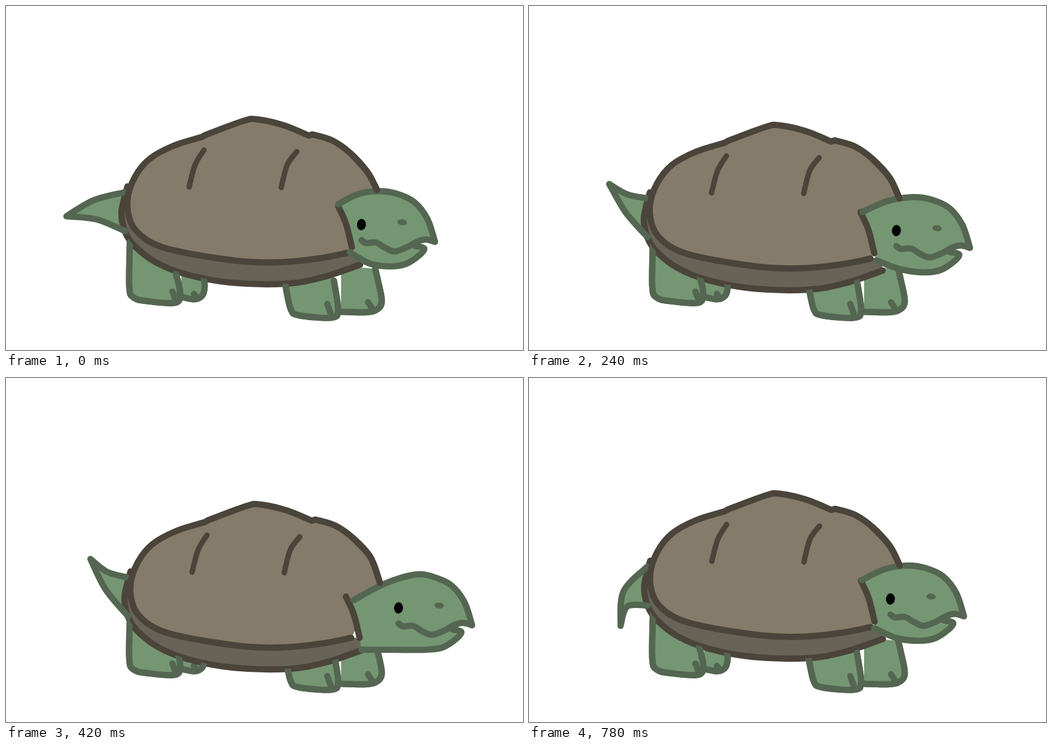
An HTML page with a canvas for the animation above (840 ms loop, 864 by 576 pixels).

```html
<!DOCTYPE html>
<html lang="en">
<head>
<meta charset="utf-8">
<title>Breathing turtle</title>
<style>
  html, body { margin: 0; width: 100%; height: 100%; overflow: hidden; background: #fff; }
  canvas { display: block; width: 864px; height: 576px; }
</style>
</head>
<body>
<canvas id="stage" width="864" height="576"></canvas>
<script>
const ctx = document.getElementById('stage').getContext('2d');
const SHELL = '#847b6a', RIM = '#676457', DARK = '#4b443b';
const GREEN = '#759672', MOSS = '#546651';
const LINE = 10.5;

// "x,y x,y / x,y": smooth runs of points, "/" marks a corner.
const parse = text => text.split('/').map(run =>
  run.trim().split(/\s+/).map(pair => pair.split(',').map(Number)));
const add = ([x, y], [dx, dy]) => [x + dx, y + dy];
const mix = (a, b, k) => a.map((v, i) => v + (b[i] - v) * k);
const shift = (runs, offset) => runs.map(run => run.map(p => add(p, offset)));

function trace(runs) {
  ctx.beginPath();
  runs.forEach((p, r) => {
    if (r) ctx.lineTo(...p[0]); else ctx.moveTo(...p[0]);
    for (let i = 0; i < p.length - 1; i++) {
      const a = p[i - 1] || p[i], b = p[i], c = p[i + 1], d = p[i + 2] || c;
      ctx.bezierCurveTo(b[0] + (c[0] - a[0]) / 6, b[1] + (c[1] - a[1]) / 6,
        c[0] - (d[0] - b[0]) / 6, c[1] - (d[1] - b[1]) / 6, ...c);
    }
  });
}
function fill(runs, color) {
  trace(runs);
  ctx.fillStyle = color;
  ctx.fill();
}
function stroke(runs, color, width = LINE) {
  trace(runs);
  ctx.strokeStyle = color;
  ctx.lineWidth = width;
  ctx.stroke();
}
function oval([x, y], rx, ry, color) {
  ctx.beginPath();
  ctx.ellipse(x, y, rx, ry, 0.08, 0, Math.PI * 2);
  ctx.fillStyle = color;
  ctx.fill();
}

// Moves with the shell.
const dome = parse('604,278 575,246 545,225 512,215 / 506,217 465,200 421,190 398,192 333,216 / ' +
  '328,219 280,234 240,256 215,287 203,325 209,363 230,388 262,404 ' +
  '320,417 400,428 460,429 520,423 572,413');
const rim = parse('203,302 193,345 199,378 215,402 250,429 300,449 375,463 468,465 530,454 592,433');
const rimInside = parse('590,415 400,380');
const marks = parse('331,241 316,266 306,303 / 486,244 470,266 460,304');
const collar = parse('578,404 568,364 555,335');

// Moves with the head.
const brow = parse('622,310 652,314 682,328 704,356 717,395');
const lip = parse('717,395 702,391 688,394 672,403 650,411 634,405 618,396 602,397 594,392');
const jaw = parse('684,402 699,406 690,418 668,432 640,436');

// Stands still.
const legs = [
  '330,452 332,470 328,485 315,491 293,487',
  '207,395 206,470 213,488 235,494 283,497 291,480 284,448',
  '617,440 621,457 628,495 617,510 595,513 560,512',
  '467,468 476,508 490,518 543,522 555,510 548,460'
].map(parse);
const toes = ['278,478 284,493', '314,482 318,487', '537,499 543,516', '605,496 612,507'].map(parse);

// From a depth of 0 (standing tall) to 4 (crouched), the neck reaches out.
function poseAt(depth) {
  const reach = 10 * depth + 11 * Math.max(0, depth - 2);
  const slip = Math.max(0, depth - 3);
  const drop = [0, 4, 10, 14, 22][depth];
  return {
    shell: [7 * slip - depth / 2, drop],
    head: [reach, Math.min(drop, 19)],
    stretch: reach / 62,
    slip
  };
}

function tailRuns([x, y], shell) {
  const tip = [x, y];
  const top = add([198, 312], shell), bottom = add([199, 377], shell);
  const bend = 6 + (y - 345 - shell[1]) / 5;
  const curve = (a, b, away) => {
    const length = Math.hypot(b[0] - a[0], b[1] - a[1]);
    const normal = [(b[1] - a[1]) / length, (a[0] - b[0]) / length];
    return [a, add(mix(a, b, 0.5), normal.map(n => n * away)), b];
  };
  return [curve(top, tip, -bend).map((p, i) => i === 1 ? add(p, [0, 0]) : p), curve(tip, bottom, bend)]
    .map((run, i) => i ? run : curve(tip, top, bend).reverse());
}

function drawHead({ shell, head, stretch, slip }) {
  const [browRun] = shift(brow, head), [lipRun] = shift(lip, head), [jawRun] = shift(jaw, head);
  const nape = [555 + 6 * stretch + 20 * slip, 332 + 40 * stretch];
  const throat = [574 + 20 * stretch, 412 + 43 * stretch];
  const top = [nape, add(mix(nape, browRun[0], 0.5), [0, -6]), ...browRun];
  const under = [...jawRun, add(mix(jawRun.at(-1), throat, 0.5), [0, 7 - 7 * stretch]), throat];
  const edge = shift(collar, add(shell, [8 * slip, 9 * slip]));
  fill([top, lipRun.slice(0, 3), under, edge[0]], GREEN);
  stroke(edge, DARK);
  stroke([top, lipRun], MOSS);
  stroke([under], MOSS);
  oval(add([594, 366], head), 7.5, 9.5, '#000');
  oval(add([662, 362], head), 8, 5, MOSS);
}

function draw(depth, tip) {
  const pose = poseAt(depth);
  const tail = tailRuns(tip, pose.shell);
  const rimRuns = shift(rim, pose.shell);
  const domeRuns = shift(dome, pose.shell);
  domeRuns[0].unshift(add([620, 308 + 13 * pose.stretch], pose.shell));
  ctx.fillStyle = '#fff';
  ctx.fillRect(0, 0, 864, 576);

  fill(tail, GREEN);
  for (const leg of legs) {
    fill([...leg, [[leg[0].at(-1)[0], 435]]], GREEN);
    stroke(leg, MOSS);
  }
  toes.forEach(toe => stroke(toe, MOSS));
  fill([...rimRuns, ...shift(rimInside, pose.shell)], RIM);
  stroke(rimRuns, DARK);
  stroke(tail, MOSS);

  // Leg tops overlap the lower half of the rim line.
  ctx.save();
  trace([...rimRuns, [[640, 433]], [[640, 576]], [[190, 576]]]);
  ctx.clip();
  legs.forEach(leg => stroke(leg, MOSS));
  ctx.restore();

  fill(domeRuns, SHELL);
  stroke(domeRuns, DARK);
  marks.forEach(mark => stroke(shift([mark], pose.shell), DARK, 9));
  drawHead(pose);
  stroke([domeRuns[0].slice(0, 3)], DARK);
}

// Start time, crouch depth, tip of the tail.
const LOOP = 840;
const steps = [
  [0, 0, [101, 352]], [60, 0, [104, 335]], [120, 1, [110, 319]],
  [240, 2, [134, 298]], [360, 3, [136, 298]], [420, 4, [141, 303]],
  [540, 3, [115, 352]], [660, 2, [127, 387]], [780, 1, [153, 415]]
];

ctx.lineCap = ctx.lineJoin = 'round';
const start = performance.now();
let shown;
function tick() {
  const t = (performance.now() - start) % LOOP;
  const step = steps.findLast(([from]) => from <= t);
  if (step !== shown) {
    shown = step;
    draw(step[1], step[2]);
  }
  requestAnimationFrame(tick);
}
tick();
</script>
</body>
</html>
```
